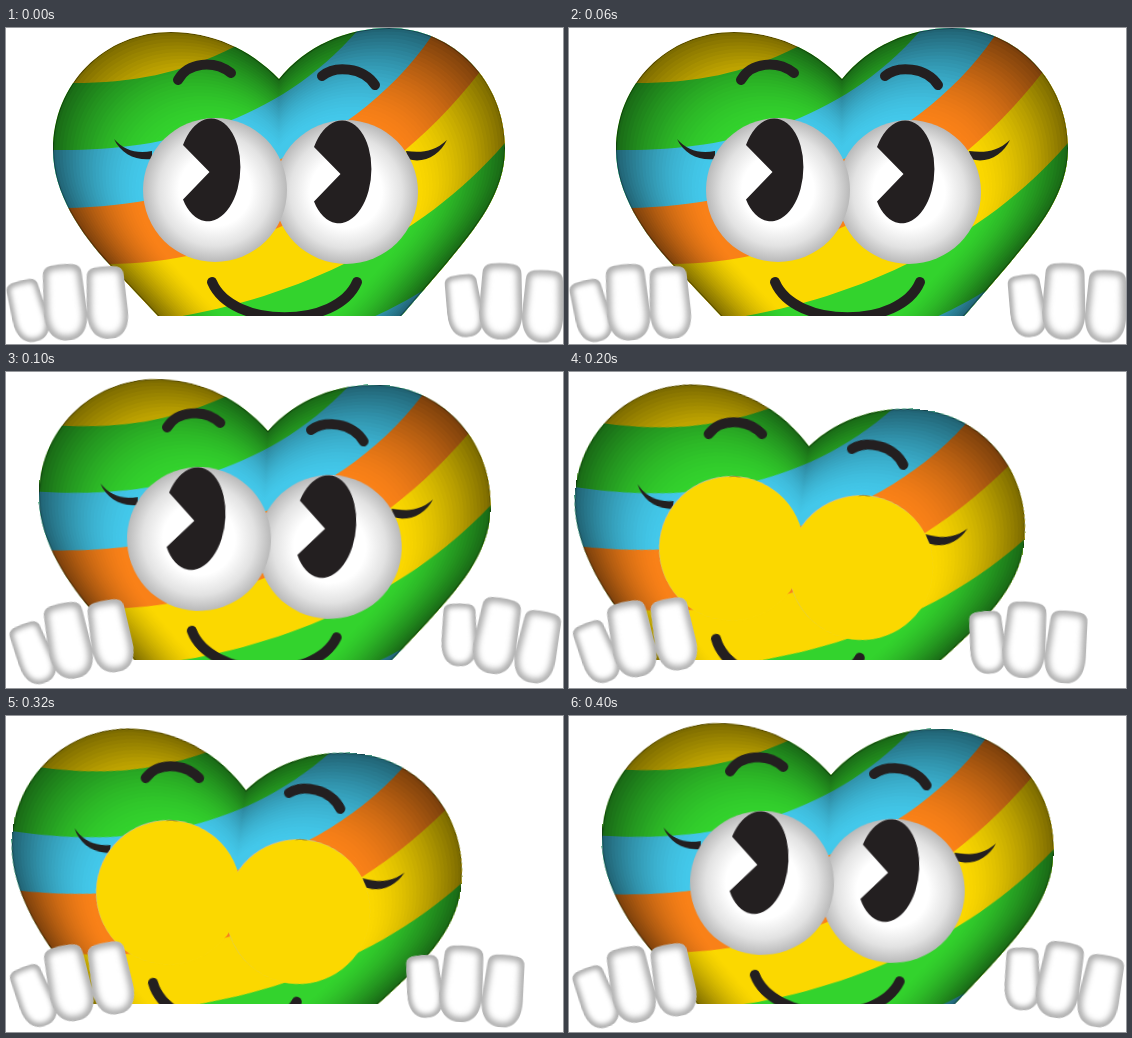
An HTML page that plays this animation: 557 by 316 pixels, repeating every 500 ms.

```html
<!DOCTYPE html>
<html lang="en">
<head>
<meta charset="utf-8">
<title>Peeking heart</title>
<style>
  html, body { margin: 0; width: 100%; height: 100%; overflow: hidden; background: #fff; }
  svg { display: block; width: 557px; height: 316px; }
</style>
</head>
<body>
<svg viewBox="0 0 557 316" xmlns="http://www.w3.org/2000/svg">
  <defs>
    <path id="heart" d="M273 51C243 20 205 4 165 4C98 4 47 56 47 122C47 165 75 206 103 236L152 288L273 416L397 286L440 236C470 200 499 165 499 120C499 54 448 0 383 0C340 0 300 18 273 51Z"/>
    <path id="nail" d="M-19 -27Q-19 -35 -11 -36.5Q0 -38 11 -36.5Q19 -35 19 -27L21 8C22 26 15 37 1 37C-14 37 -21 26 -21 8Z"/>
    <clipPath id="inHeart"><use href="#heart"/></clipPath>
    <clipPath id="inNail"><use href="#nail"/></clipPath>
    <clipPath id="ledge"><rect width="557" height="288"/></clipPath>
    <mask id="shade" maskUnits="userSpaceOnUse" x="0" y="-10" width="560" height="440"></mask>
    <filter id="soft" filterUnits="userSpaceOnUse" x="-40" y="-60" width="80" height="120" color-interpolation-filters="sRGB">
      <feGaussianBlur stdDeviation="3.2"/>
    </filter>
    <radialGradient id="ball">
      <stop offset=".5" stop-color="#fff"/>
      <stop offset=".78" stop-color="#e2e2e2"/>
      <stop offset="1" stop-color="#b9b9b9"/>
    </radialGradient>
    <g id="eye">
      <circle cx="209" cy="162" r="72" fill="url(#ball)"/>
      <path d="M177 117L203.5 144L177 171.5A31 51.5 3 1 0 177 117Z" fill="#231f20"/>
    </g>
    <g id="finger" clip-path="url(#inNail)">
      <use href="#nail" fill="#fff"/>
      <use href="#nail" fill="none" stroke="#a8a8a8" stroke-width="9" filter="url(#soft)"/>
    </g>
    <g id="hand">
      <use href="#finger" transform="translate(-37 4.5) rotate(-8) scale(.85)"/>
      <use href="#finger" transform="translate(42 5) rotate(3) scale(.98)"/>
      <use href="#finger" transform="rotate(2) scale(1.03)"/>
    </g>
  </defs>

  <g clip-path="url(#ledge)">
    <g id="body">
      <g clip-path="url(#inHeart)">
        <use href="#heart" fill="#fbd800"/>
        <g id="stripes"></g>
        <use href="#heart" mask="url(#shade)"/>
        <use href="#heart" fill="none" stroke="#000" stroke-opacity=".35" stroke-width="2"/>
      </g>
      <g fill="#231f20">
        <path d="M108 111C118 122 130 126 146 123L146 131C130 133 115 126 108 111Z"/>
        <path d="M441 112C428 124 415 125 400 123L402 131C418 136 434 127 441 112Z"/>
      </g>
      <g fill="none" stroke="#231f20" stroke-linecap="round" stroke-width="10">
        <path d="M172 52C182 34 208 32 225 45"/>
        <path d="M316 48C329 37 357 39 369 57"/>
        <path d="M206 254C226 301 331 301 351 254"/>
      </g>
      <use href="#eye" x="131" y="2"/>
      <use href="#eye"/>
      <g id="lids" fill="#fbd800">
        <circle cx="340.7" cy="164.7" r="72.3"/>
        <circle cx="209.7" cy="162.7" r="72.3"/>
      </g>
    </g>
  </g>
  <use id="left" href="#hand"/>
  <use id="right" href="#hand"/>
</svg>
<script>
const NS = 'http://www.w3.org/2000/svg';
const STEP = 100;
const ORDER = [0, 1, 2, 2, 1];   // pose held during each step

const byId = id => document.getElementById(id);

function add(parent, tag, attrs) {
  const el = document.createElementNS(NS, tag);
  for (const key in attrs) el.setAttribute(key, attrs[key]);
  byId(parent).appendChild(el);
}

// Each stripe fills everything below its upper edge.
const green = '#33d32d', blue = '#43c8ea', orange = '#f98118', yellow = '#fbd800';
[
  [green,  'M20 56L68 55C125 55 175 46 228 19L262 -6'],
  [blue,   'M20 122L47 122C150 124 268 99 352 2L372 -30'],
  [orange, 'M20 181L60 180C185 178 343 128 425 9L443 -25'],
  [yellow, 'M20 236L103 236C220 236 370 178 473 45L500 12'],
  [green,  'M60 302L165 290C290 270 415 212 498 116L530 75'],
  [blue,   'M250 330Q350 304 418 262L500 200']
].forEach(([fill, edge]) =>
  add('stripes', 'path', { fill, d: edge + 'L620 -60V500H0Z' }));

// Nested hearts, shrinking towards a focus, fade the dark rim to clear.
const BANDS = 26;
for (let i = 0; i <= BANDS; i++) {
  const k = i / BANDS;
  const dark = Math.round(255 * 0.5 * (1 - k) ** 1.5);
  add('shade', 'use', {
    href: '#heart', fill: `rgb(${dark},${dark},${dark})`,
    transform: `translate(273 235) scale(${1 - 0.38 * k}) translate(-273 -235)`
  });
}

// Holds each pose until the next step begins.
function play(id, prop, poses) {
  const frames = [...ORDER, ORDER[ORDER.length - 1]].map((pose, i) => ({
    [prop]: poses[pose], offset: i / ORDER.length, easing: 'steps(1, end)'
  }));
  byId(id).animate(frames, { duration: STEP * ORDER.length, iterations: Infinity }).startTime = 0;
}

const place = (x, y, tilt) => `translate(${x}px, ${y}px) rotate(${tilt}deg)`;
const fromEye = ' translate(-209px, -162px)';   // the body turns about its left eye

play('body', 'transform',
  [place(209, 162, 0), place(193, 167, 2.6), place(162, 176, 7.5)].map(t => t + fromEye));
play('lids', 'opacity', [0, 0, 1]);
play('left', 'transform', [place(58.5, 274.5, -6.5), place(62.5, 269, -13), place(63, 267.5, -13.5)]);
play('right', 'transform', [place(495, 273.5, 0), place(490.5, 264, 8.5), place(455.5, 268, 3)]);
</script>
</body>
</html>
```
